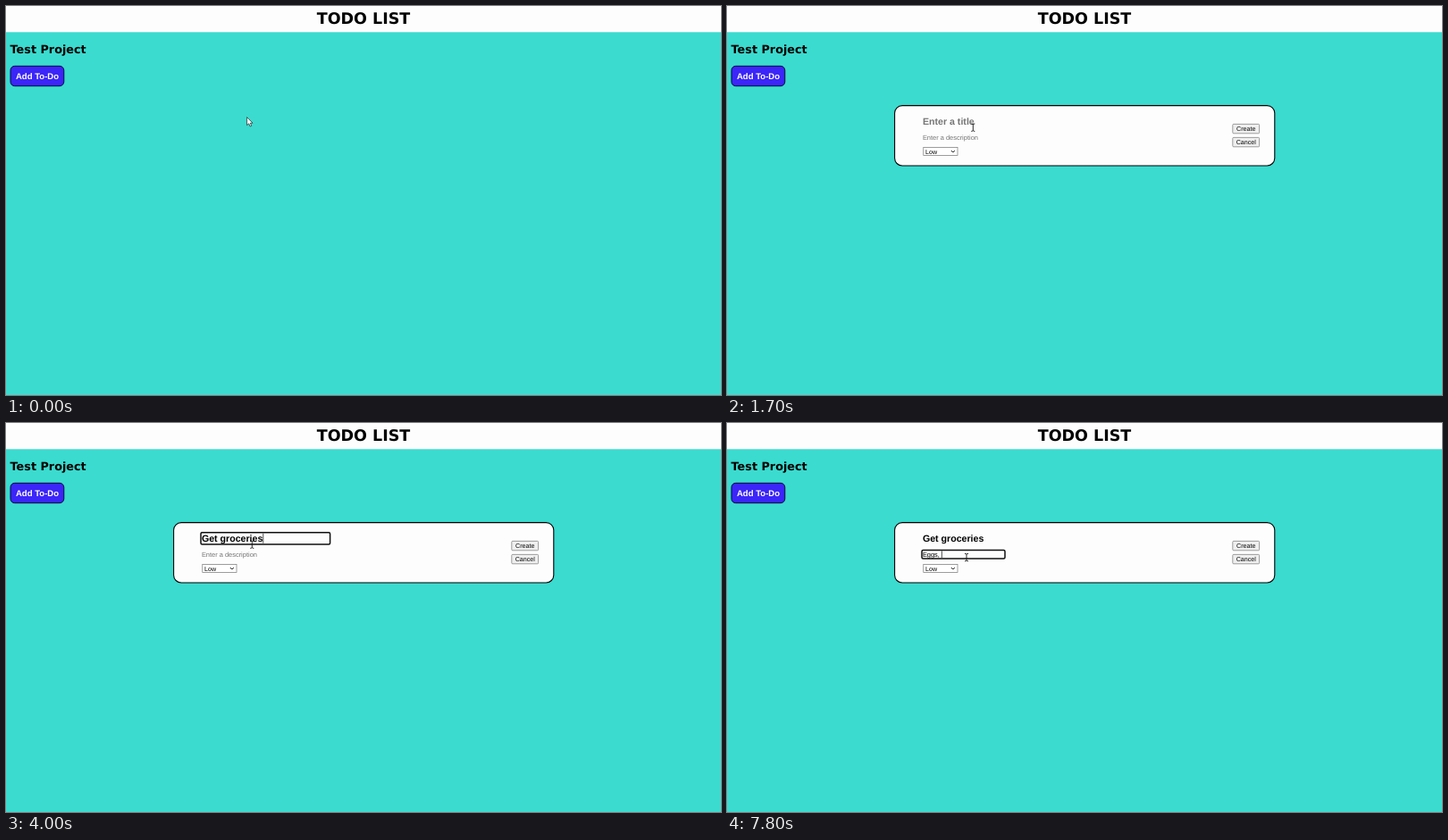
These frames come from a looping animation (800x436 px, 8000 ms). An HTML page:

```html
<!DOCTYPE html>
<html lang="en">
<head>
<meta charset="utf-8">
<title>Todo list</title>
<style>
  html, body { margin: 0; width: 100%; height: 100%; overflow: hidden; background: #3bdbcf; }
  svg { display: block; width: 100vw; height: 100vh; }
  text { font-family: "Liberation Sans", Arial, sans-serif; white-space: pre; text-rendering: geometricPrecision; }
  .head { font-family: "DejaVu Sans", Verdana, sans-serif; font-weight: bold; }
  .title { font-size: 10.64px; font-weight: bold; }
  .desc { font-size: 7.45px; }
  .small { font-size: 7.1px; }
  .ring { fill: none; stroke: #101010; stroke-width: 1.5; }
  .control { fill: #efefef; stroke: #767676; stroke-width: .7; }
  .empty { fill: #757575; }
</style>
</head>
<body>
<svg viewBox="0 0 800 436">
  <rect width="800" height="436" fill="#3bdbcf"/>
  <rect width="800" height="29.3" fill="#fefdfe"/>
  <text class="head" x="400" y="20.4" font-size="17.5" text-anchor="middle">TODO LIST</text>
  <text class="head" x="4.6" y="53" font-size="12.8">Test Project</text>
  <rect x="5" y="67.3" width="59.8" height="22.4" rx="4.8" fill="#3b25f8" stroke="#0b0838"/>
  <text x="35" y="81.5" font-size="9.58" font-weight="bold" fill="#fff" text-anchor="middle">Add To-Do</text>

  <g id="card">
    <rect x="187.6" y="111.6" width="425.2" height="67.4" rx="8.5" fill="#fefdfe" stroke="#000" stroke-width="1.1"/>
    <rect id="titleRing" class="ring" x="218" y="122.7" width="144.6" height="13.2" rx="1.5"/>
    <rect id="descRing" class="ring" x="218" y="142.4" width="93" height="9.6" rx="1.5"/>
    <text id="title" class="title" x="218.9" y="132.7"></text>
    <text id="desc" class="desc" x="218.9" y="149.5"></text>
    <path id="caret" stroke="#000" stroke-width=".7"/>
    <rect class="control" x="219.8" y="158.6" width="38.2" height="8.8" style="fill:#fff"/>
    <text class="small" x="222" y="165.7">Low</text>
    <path d="M250.8 162l2 2 2-2" fill="none" stroke="#111" stroke-width="1"/>
    <rect class="control" x="565.8" y="132.4" width="29.8" height="10.4" rx="1"/>
    <text class="small" x="580.7" y="140.2" text-anchor="middle">Create</text>
    <rect class="control" x="565.8" y="147.4" width="29.8" height="10.4" rx="1"/>
    <text class="small" x="580.7" y="155.2" text-anchor="middle">Cancel</text>
  </g>

  <path id="arrow" d="M0 0V9L2.1 7.2L3.5 10.4L5.1 9.7L3.7 6.6H6.4Z" fill="#fff" stroke="#000" stroke-width=".6"/>
  <path id="beam" d="M-2-4Q0-4 0-3Q0-4 2-4M0-3V3.4M-2 4.4Q0 4.4 0 3.4Q0 4.4 2 4.4" fill="none" stroke="#111" stroke-width=".9"/>
</svg>
<script>
const LOOP = 8000, STEP = 100;
const OPEN = 800, FOCUS_TITLE = 1800, FOCUS_DESC = 5100;
const $ = id => document.getElementById(id);
const show = (id, on) => $(id).setAttribute("visibility", on ? "inherit" : "hidden");

// Pointer moves: start, end, from, to
const moves = [
  [0, 700, [269.6, 124.6], [51, 79.5]],
  [900, 1650, [51, 79.5], [275.3, 136]],
  [4200, 4800, [275.3, 136], [268, 150.4]]
];

const fields = {
  title: { text: "Get groceries", hint: "Enter a title", focus: FOCUS_TITLE, top: 123.8, bottom: 134.8,
    keys: [2400, 2500, 2600, 2700, 2900, 3100, 3200, 3300, 3500, 3600, 3700, 3900, 4000] },
  desc: { text: "Eggs, ", hint: "Enter a description", focus: FOCUS_DESC, top: 143.4, bottom: 151,
    keys: [6900, 7100, 7300, 7400, 7600, 7800] }
};

const ease = p => p * p * (3 - 2 * p);

function pointerAt(t) {
  const [start, end, from, to] = moves.filter(m => t >= m[0]).pop();
  const p = ease(Math.min(1, (t - start) / (end - start)));
  return from.map((v, i) => v + (to[i] - v) * p);
}

function inside(x, y, left, top, right, bottom) {
  return x >= left && x <= right && y >= top && y <= bottom;
}

function drawField(id, t) {
  const f = fields[id], el = $(id);
  const count = f.keys.filter(k => k <= t).length;
  el.textContent = count ? f.text.slice(0, count) : f.hint;
  el.classList.toggle("empty", !count);
  return count;
}

function drawCaret(id, t, count) {
  const f = fields[id];
  const last = count ? f.keys[count - 1] : f.focus;
  const x = 218.9 + (count ? $(id).getSubStringLength(0, count) : 0);
  $("caret").setAttribute("d", `M${x + .35} ${f.top}V${f.bottom}`);
  show("caret", (t - last) % 1000 < 500);
}

function draw(now) {
  const t = Math.floor(now % LOOP / STEP) * STEP;
  const active = t >= FOCUS_DESC ? "desc" : t >= FOCUS_TITLE ? "title" : "";
  const counts = { title: drawField("title", t), desc: drawField("desc", t) };

  show("card", t >= OPEN);
  show("titleRing", false);
  show("descRing", false);
  show("caret", false);
  if (active) {
    show(active + "Ring", true);
    drawCaret(active, t, counts[active]);
  }

  const [x, y] = pointerAt(t);
  const overText = t >= OPEN &&
    (inside(x, y, 217, 122, 363, 137) || inside(x, y, 217, 142, 311, 153));
  show("arrow", !overText);
  show("beam", overText);
  for (const id of ["arrow", "beam"]) $(id).setAttribute("transform", `translate(${x} ${y})`);
}

function tick(now) {
  draw(now);
  requestAnimationFrame(tick);
}
draw(0);
requestAnimationFrame(tick);
</script>
</body>
</html>
```
